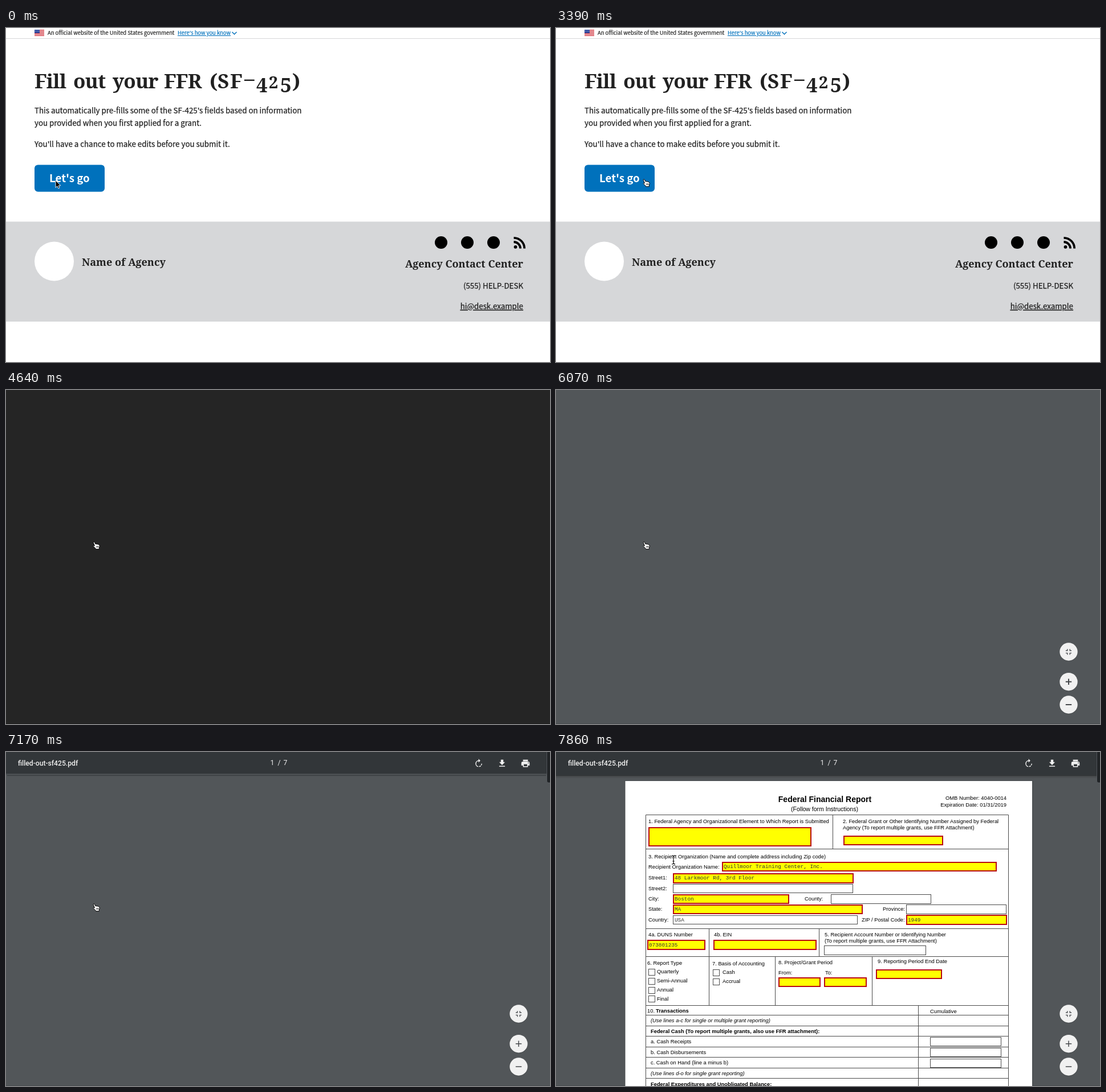
Write an HTML page that moves like this. It is 954 px wide and 587 px high and loops after 8 s.

```html
<!DOCTYPE html>
<html lang="en">
<head>
<meta charset="utf-8">
<title>Fill out your FFR</title>
<style>
  html, body { margin: 0; width: 100%; height: 100%; overflow: hidden; background: #fff; }
  svg { display: block; width: 954px; height: 587px; }
  text { fill: #212121; white-space: pre; }
  .body, .banner, .button { font-family: "Noto Sans CJK SC", "Noto Sans CJK JP", "Noto Sans CJK", sans-serif; }
  .body { font-size: 13.33px; stroke: #212121; stroke-width: .25px; }
  .banner { font-size: 9.4px; stroke: #212121; stroke-width: .2px; }
  .button { font-size: 18.7px; font-weight: 700; fill: #fff; }
  .link { fill: #0071bc; stroke: #0071bc; text-decoration: underline; }
  .under { text-decoration: underline; }
  .title, .head { font-family: "Noto Serif", serif; font-weight: 700; }
  .title { font-size: 35px; letter-spacing: -.9px; }
  .head { font-size: 18.1px; }
  .bar { font: 500 12.18px Roboto, sans-serif; fill: #f1f1f1; }
  .form { font: 9.35px "Liberation Sans", Arial, sans-serif; fill: #000; }
  .bold { font-weight: 700; }
  .italic { font-style: italic; }
  .big { font-size: 14px; }
  .mid { font-size: 10.5px; }
  .value { font: 9.35px "Liberation Mono", monospace; fill: #333; }
  .end { text-anchor: end; }
  .center { text-anchor: middle; }
</style>
</head>
<body>
<svg id="stage" viewBox="0 0 954 587" xmlns="http://www.w3.org/2000/svg"></svg>
<script>
const LOOP = 8000;
const stage = document.getElementById('stage');

function add(parent, tag, attrs = {}, content = '') {
  const node = document.createElementNS('http://www.w3.org/2000/svg', tag);
  for (const key in attrs) node.setAttribute(key, attrs[key]);
  if (content) node.textContent = content;
  parent.appendChild(node);
  return node;
}
const group = (parent = stage, attrs = {}) => add(parent, 'g', attrs);
const label = (parent, x, y, content, cls) => add(parent, 'text', { x, y, class: cls }, content);
const path = (parent, d, attrs) => add(parent, 'path', { d, ...attrs });
const rect = (parent, x, y, width, height, fill, attrs = {}) =>
  add(parent, 'rect', { x, y, width, height, fill, ...attrs });
const disc = (parent, cx, cy, r, fill) => add(parent, 'circle', { cx, cy, r, fill });

// Start page
const site = group();
rect(site, 0, 0, 954, 587, '#fff');
rect(site, 0, 18, 954, 1, '#d6d7d9');
rect(site, 50, 3, 17, 11, '#f4eeee');
for (let i = 0; i < 6; i++) rect(site, 50, 3 + i * 2, 17, 1, '#d3222f');
rect(site, 50, 3, 9, 6, '#29449b');
for (let i = 0; i < 6; i++) rect(site, 51 + i % 3 * 3, 4 + (i > 2) * 2, 1, 1, '#b9c3e4');
label(site, 73, 12, 'An official website of the United States government', 'banner');
label(site, 301, 12, "Here's how you know", 'banner link');
path(site, 'M396.5 7l4 4 4-4', { fill: 'none', stroke: '#0071bc', 'stroke-width': 1.4 });

for (const [x, word] of [[50, 'Fill'], [118, 'out'], [187, 'your'], [277, 'FFR'], [357, '('], [371, 'S'], [393, 'F'], [502, ')']])
  label(site, x, 106, word, 'title');
label(site, 418, 101, '–', 'title');
// Old-style figures: 4 and 5 hang below the line, 2 sits at x-height
label(site, 439, 113, '4', 'title');
label(site, 461, 106, '2', 'title').style.fontSize = '29px';
label(site, 481, 113, '5', 'title');

label(site, 50, 150, "This automatically pre-fills some of the SF-425's fields based on information", 'body');
label(site, 50, 172, 'you provided when you first applied for a grant.', 'body');
label(site, 50, 209, "You'll have a chance to make edits before you submit it.", 'body');

const focusRing = rect(site, 46, 237, 131, 54.5, 'none',
  { stroke: '#a2a4a8', 'stroke-width': 1.7, 'stroke-dasharray': '1.7 1.7' });
const button = rect(site, 50, 240.6, 123, 47.2, '#0071bc', { rx: 6 });
label(site, 76, 271, "Let's go", 'button');

rect(site, 0, 340.3, 954, 175.7, '#d6d7d9');
disc(site, 84.5, 410, 34.5, '#fff');
label(site, 133, 418, 'Name of Agency', 'head');
for (const x of [763, 809, 855]) disc(site, x, 377, 11, '#000');
disc(site, 893.5, 384.8, 2.9, '#000');
path(site, 'M890.5 376a11.5 11.5 0 0 1 11.5 11.5M890.5 368.8a18.7 18.7 0 0 1 18.7 18.7',
  { fill: 'none', stroke: '#000', 'stroke-width': 3.8 });
label(site, 907, 421, 'Agency Contact Center', 'head end');
label(site, 907, 458, '(555) HELP-DESK', 'body end');
label(site, 907, 494, 'hi@desk.example', 'body end under');

// Document viewer
const dark = group();
rect(dark, 0, 0, 954, 587, '#252525');
rect(dark, 0, 586, 954, 1, '#1d1d1d');

const viewer = group();
rect(viewer, 0, 0, 954, 587, '#525659');
rect(viewer, 0, 586, 954, 1, '#474b4e');

const sheet = group(viewer);
rect(sheet, 120, 50, 716.5, 540, '#4a4e51');
rect(sheet, 121.5, 51, 713.5, 540, '#fff');

const rules = [
  'M157.5 587V110.5H793.5V587',
  ...[171, 311, 360, 446, 463, 482, 500, 519, 537, 556, 574].map(y => `M157.5 ${y - .5}H793.5`),
  'M485.5 110V171M268.5 311V446M461.5 311V360M384.5 360V446M554.5 360V446M635.5 446V587'
];
path(sheet, rules.join(''), { fill: 'none', stroke: '#4a4a4a', 'stroke-width': 1 });

const required = [
  [162, 132, 286, 34], [504, 147, 175, 17], [291, 193, 482, 17], [205, 213, 317, 18],
  [205, 250, 204, 17], [205, 268, 333, 17], [614, 286, 177, 18], [160, 330, 102, 18],
  [276, 330, 181, 18], [390, 396, 74, 17], [470, 396, 75, 17], [561, 382, 116, 17]
];
const optional = [
  [205, 232, 316, 16], [482, 250, 176, 17], [614, 268, 176, 17], [205, 287, 324, 16], [470, 340, 179, 17],
  ...[381, 397, 413, 428].map(y => [162, y, 12, 12]),
  ...[382, 398].map(y => [275, y, 12, 12]),
  ...[501, 520, 539].map(y => [656, y, 125, 16])
];
for (const [x, y, w, h] of optional)
  rect(sheet, x + .5, y + .5, w - 1, h - 1, '#fff', { stroke: '#4a4a4a' });
for (const [x, y, w, h] of required)
  rect(sheet, x + 1, y + 1, w - 2, h - 2, '#ff0', { stroke: '#b80a12', 'stroke-width': 2 });

const formText = [
  [162, 125, '1. Federal Agency and Organizational Element to Which Report is Submitted'],
  [503, 125, '2. Federal Grant or Other Identifying Number Assigned by Federal'],
  [503, 136, 'Agency (To report multiple grants, use FFR Attachment)'],
  [162, 187, '3. Recipient Organization (Name and complete address including Zip code)'],
  [162, 205, 'Recipient Organization Name:'],
  [162, 224, 'Street1:'], [162, 243, 'Street2:'], [162, 261, 'City:'],
  [162, 279, 'State:'], [162, 298, 'Country:'],
  [436, 261, 'County:'], [573, 279, 'Province:'], [536, 298, 'ZIP / Postal Code:'],
  [162, 324, '4a. DUNS Number'], [277, 324, '4b. EIN'],
  [471, 324, '5. Recipient Account Number or Identifying Number'],
  [471, 335, '(To report multiple grants, use FFR Attachment)'],
  [160, 374, '6. Report Type'], [274, 375, '7. Basis of Accounting'],
  [390, 373, '8. Project/Grant Period'], [564, 371, '9. Reporting Period End Date'],
  [177, 389, 'Quarterly'], [177, 405, 'Semi-Annual'], [177, 421, 'Annual'], [177, 437, 'Final'],
  [292, 390, 'Cash'], [292, 406, 'Accrual'], [390, 391, 'From:'], [472, 391, 'To:'],
  [160, 458, '10.'], [656, 459, 'Cumulative'],
  [166, 512, 'a. Cash Receipts'], [166, 531, 'b. Cash Disbursements'],
  [166, 549, 'c. Cash on Hand (line a minus b)']
];
const styledText = [
  [471.5, 88, 'Federal Financial Report', 'form bold big center'],
  [471, 103.5, '(Follow form Instructions)', 'form mid center'],
  [790, 84, 'OMB Number: 4040-0014', 'form end'],
  [790, 96, 'Expiration Date: 01/31/2019', 'form end'],
  [175, 458, 'Transactions', 'form bold'],
  [166, 475, '(Use lines a-c for single or multiple grant reporting)', 'form italic'],
  [166, 494, 'Federal Cash (To report multiple grants, also use FFR attachment):', 'form bold'],
  [166, 568, '(Use lines d-o for single grant reporting)', 'form italic'],
  [166, 587, 'Federal Expenditures and Unobligated Balance:', 'form bold'],
  [294, 204, 'Quillmoor Training Center, Inc.', 'value'],
  [208, 224, '48 Larkmoor Rd, 3rd Floor', 'value'],
  [208, 261, 'Boston', 'value'], [208, 279, 'MA', 'value'], [208, 298, 'USA', 'value'],
  [617, 298, '1949', 'value'], [163, 342, '073801235', 'value']
];
for (const [x, y, content] of formText) label(sheet, x, y, content, 'form');
for (const row of styledText) label(sheet, ...row);

const toolbar = group(viewer);
const thinBar = group(toolbar);
rect(thinBar, 0, 0, 954, 38, '#323639');
const loadStrip = group(toolbar);
rect(loadStrip, 0, 38, 954, 3, '#4a4e51');
rect(loadStrip, 2, 41, 945, 1, '#373b3e');
const fullBar = group(toolbar);
rect(fullBar, 0, 0, 954, 41.5, '#323639');
rect(fullBar, 0, 41, 954, 2, '#000', { opacity: .22 });
rect(fullBar, 0, 43, 954, 3, '#000', { opacity: .08 });

label(toolbar, 21, 24, 'filled-out-sf425.pdf', 'bar');
for (const [x, content] of [[463.5, '1'], [476.5, '/'], [486.5, '7']])
  label(toolbar, x, 23, content, 'bar').style.fontWeight = 400;

const icon = (parent, x, y, d, attrs) =>
  path(parent, d, { transform: `translate(${x} ${y}) scale(.725) translate(-12 -12)`, ...attrs });
const white = { fill: '#f1f1f1' };
const turn = { fill: 'none', stroke: '#f1f1f1', 'stroke-width': 2 };
icon(toolbar, 829, 20, 'M12 5.5A7.2 7.2 0 0 0 11 19.8', turn);
icon(toolbar, 829, 20, 'M13 19.8A7.2 7.2 0 0 0 19 11.2', { ...turn, 'stroke-dasharray': '4.2 1.6' });
icon(toolbar, 829, 20, 'M11.5 1v9l4.5-4.5z', white);
icon(toolbar, 870, 20, 'M19 9h-4V3H9v6H5l7 7 7-7zM5 18v2h14v-2z', white);
icon(toolbar, 911, 20, 'M6 3h12v4H6zM5 8h14a3 3 0 0 1 3 3v6h-4v4H6v-4H2v-6a3 3 0 0 1 3-3zM8 14v5h8v-5zM18 10v2h2v-2z',
  { ...white, 'fill-rule': 'evenodd' });

const scrollbar = rect(viewer, 948.5, -4, 8, 58, '#202326', { rx: 3, stroke: '#60656a', 'stroke-width': .7 });

for (const y of [460, 512.7, 553]) {
  disc(viewer, 899, y + .8, 16, '#4a4e50');
  disc(viewer, 899, y, 15.7, '#f1f1f1');
}
icon(viewer, 899, 460.2, 'M5 14h5v5H8v-3H5zM8 5h2v5H5V8h3zM14 14h5v2h-3v3h-2zM14 5h2v3h3v2h-5z', { fill: '#505357' });
const zoomSigns = path(viewer, 'M893.8 512.7h10.4M899 507.5v10.4M893.8 553h10.4', { stroke: '#45484b' });

// Cursors, each drawn around its own hot corner
const arrow = group();
path(arrow, 'M0 0V12.5L2.9 9.8 4.8 14 6.9 13.1 5 9H8.9Z', { fill: '#000', stroke: '#fff', 'stroke-width': .9 });

const hand = group();
path(hand, 'M1.3 3Q.8 1.2 2.2 1.2 3.1 1.2 3.6 2.3L5 5.2Q6 4.4 7 5.2 8.2 4.6 9 5.6 10.4 5.2 10.9 6.4 12.4 6.6 12.2 9L11.3 11.6V14H5.6L5.2 12.8 2 9.8Q.6 8.4 1.6 7.8 2.6 7.4 3.6 8.3Z',
  { fill: '#fff', stroke: '#000', 'stroke-width': 1, 'stroke-linejoin': 'round' });
path(hand, 'M6.7 8.3v3M8.4 8.3v3M10 8.3v3', { stroke: '#000', 'stroke-width': .7 });

const beam = group();
for (const [stroke, width] of [['#fff', 2.6], ['#000', 1.1]])
  path(beam, 'M-3-7.6Q0-7.6 0-5.6 0-7.6 3-7.6M0-6V6M-3 7.6Q0 7.6 0 5.6 0 7.6 3 7.6M-1.5 2.5H1.5',
    { fill: 'none', stroke, 'stroke-width': width });

const cursors = { arrow, hand, beam };
const cursorSteps = [
  [0, 'arrow', 87, 268], [790, 'beam', 112, 272], [1030, 'hand', 157, 256], [1200, 'arrow', 158, 257],
  [3390, 'hand', 152, 264.7], [3570, 'hand', 152, 265.7], [7620, 'arrow', 154, 253], [7860, 'beam', 206, 189.5]
];
const buttonSteps = [[0, '#0071bc'], [3570, '#205493'], [3960, '#112e51'], [4190, '#205493']];

const at = (steps, time) => steps.findLast(step => step[0] <= time);
const show = (node, visible) => { node.style.display = visible ? '' : 'none'; };

function render(time) {
  show(site, time < 4640);
  show(dark, time >= 4640 && time < 6070);
  show(viewer, time >= 6070);
  show(focusRing, time >= 3960);
  button.setAttribute('fill', at(buttonSteps, time)[1]);

  show(toolbar, time >= 6350);
  show(scrollbar, time >= 6760);
  show(loadStrip, time >= 7170 && time < 7470);
  show(thinBar, time < 7470);
  show(fullBar, time >= 7470);
  show(sheet, time >= 7470);
  zoomSigns.setAttribute('stroke-width', time < 6350 ? 2 : 1.5);

  const [, kind, x, y] = at(cursorSteps, time);
  for (const name in cursors) show(cursors[name], name === kind);
  cursors[kind].setAttribute('transform', `translate(${x} ${y})`);
}

const start = performance.now();
function tick() {
  render((performance.now() - start) % LOOP);
  requestAnimationFrame(tick);
}
tick();
</script>
</body>
</html>
```
